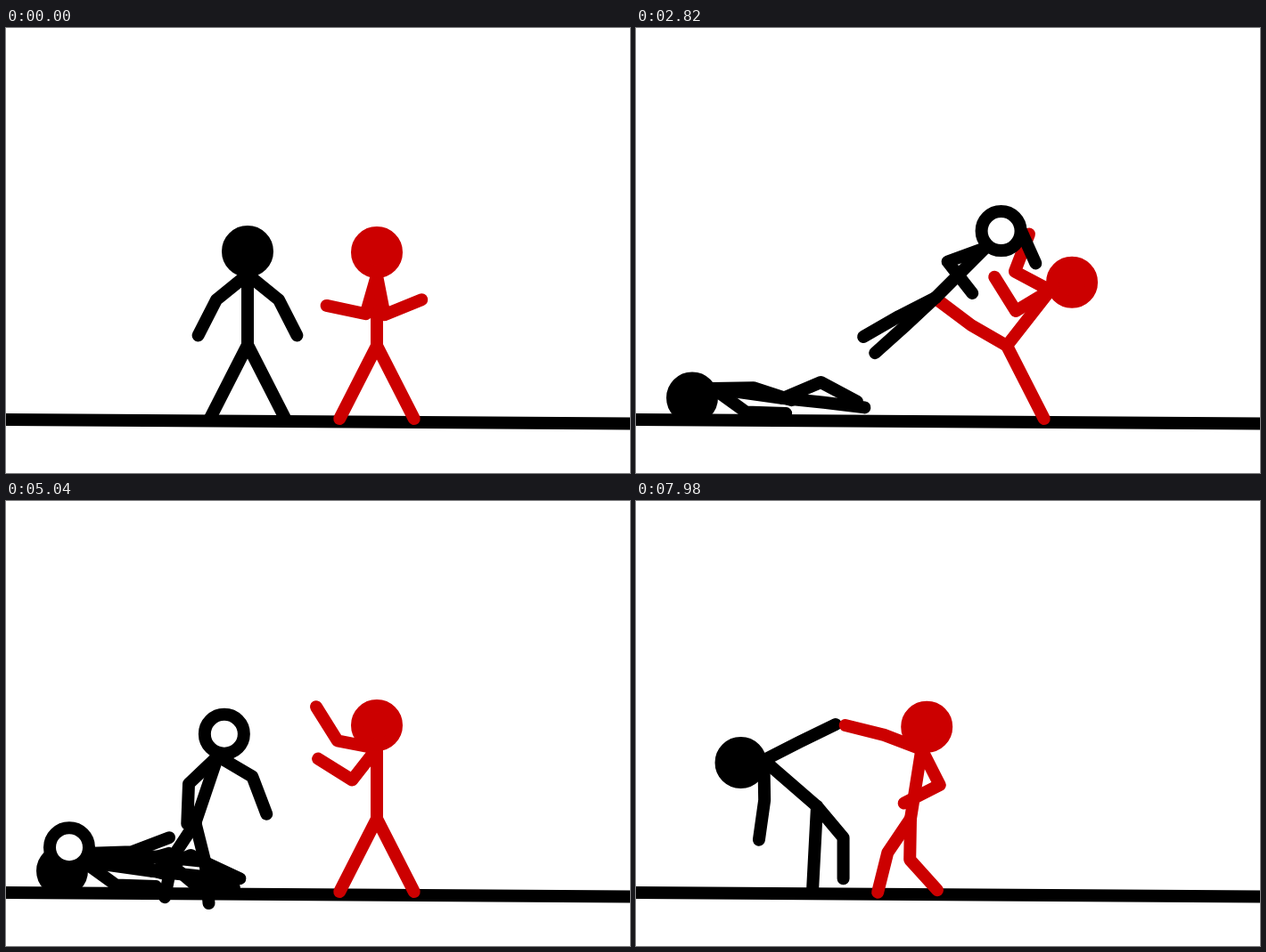
An HTML page with a canvas that plays this animation: 700 by 500 pixels, repeating every 8000 ms.

```html
<!DOCTYPE html>
<html>
<head>
<meta charset="utf-8">
<style>
html, body { margin: 0; width: 100%; height: 100%; overflow: hidden; background: #fff; }
canvas { display: block; }
</style>
</head>
<body>
<canvas id="stage" width="700" height="500"></canvas>
<script>
const ctx = document.getElementById('stage').getContext('2d');
const LOOP = 8000, STEP = 60, RED = '#c00', BLACK = '#000';
const TORSO = 79, NECK = 26, ARM = 45, LEG = 46, HEAD = 22, WIDTH = 14;

// A pose is the hip position plus bone directions in degrees (0 right, 90 down):
// body = torso, head; arms = upper, fore, twice; legs = thigh, shin, twice
const pose = (x, y, body, arms, legs) => ({ x, y, body, arms, legs });
const PARTS = ['body', 'arms', 'legs'];
const reach = (p, arms) => ({ ...p, arms });
const mirror = angles => angles.map(a => 180 - a);

function place(p, x, y, turn = 0) {
  const moved = { x, y };
  PARTS.forEach(part => moved[part] = p[part].map(a => a + turn));
  return moved;
}

const UPRIGHT = [-90, -90], STANCE = [117, 117, 63, 63], GUARD = [191, 238, 128, 212];

// Red fighter
const shrug = pose(416, 357, UPRIGHT, [106, 192, 79, -22], STANCE);
const guard = reach(shrug, GUARD);
const kick = pose(416, 357, [-52, -20], [208, 291, 149, 238], [210, 217, 63, 63]);
const lift = pose(413, 372, [-89, -81], [190, 249, 226, 310], [131, 36, 74, 20]);
const punch = pose(374, 357, [-81, -81], [141, 196, 62, 151], [131, 109, 98, 56]);
const launch = pose(325, 357, [-62, -57], [250, 311, 82, 170], [128, 83, 84, 62]);
const pull = pose(308, 357, [-81, -77], [201, 194, 63, 153], [124, 104, 91, 48]);

// Black fighters
const stand = pose(271, 356, UPRIGHT, [141, 117, 39, 63], STANCE);
const fists = reach(stand, mirror(GUARD));
const lying = pose(172, 415, [188, 156], [-1, 18, 36, 2], [-23, 28, 6, 7]);
const helped = pose(203, 343, [221, 174], [-27, -26, 89, 98], [93, 93, 50, 90]);
const kicked = pose(336, 303, [-45, -47], [160, 52, -32, 66], [153, 150, 137, 138]);
const prone = pose(178, 384, [3, -9], [118, -7, -3, 94], [149, 38, 128, 173]);
const kneel = pose(132, 310, [-94, -105], [20, -103, -102, -5], [149, 165, 115, 180]);
const held = pose(366, 146, [231, 235], [105, 79, 21, -51], [95, 113, 46, 72]);
const flat = pose(175, 400, [183, 195], [-2, -21, 16, -16], [6, 25, 40, 6]);
const flung = pose(344, 135, [225, 234], [33, 19, 58, 18], [1, 22, 30, 15]);

// Each key: hold from, hold until, pose, height of the hop leading to it
const black = [
  [0, 60, stand], [840, 960, place(fists, 311, 356)], [1620, 1860, lying, 60],
  [2100, 7440, place(lying, 165, 416)], [7980, 7980, helped]
];
const red = [
  [0, 60, shrug], [840, 900, reach(guard, punch.arms)], [1020, 1200, reach(guard, launch.arms)],
  [1560, 2220, guard], [2520, 2940, kick], [3360, 3660, guard], [4140, 4320, lift],
  [4440, 4620, reach(guard, punch.arms)], [4980, 5340, guard], [5820, 6120, punch],
  [6840, 6840, place(punch, 333, 357)], [6960, 7440, launch], [7980, 7980, pull]
];
const ringA = [
  [2100, 2100, place(kicked, 120, -110, -20)], [2820, 2880, kicked], [3480, 4560, prone, 110],
  [5160, 5340, place(stand, 221, 356)], [5760, 5760, place(fists, 283, 350)],
  [5940, 5940, kneel], [6240, 6240, place(kneel, -130, 370, -40), 20]
];
const ringB = [
  [3660, 3660, place(held, -90, 290, 30)], [4260, 4320, held, 35],
  [4440, 4620, place(held, 290, 310, -45)], [5040, 6180, flat, 15],
  [6540, 6540, place(stand, 161, 356)], [6900, 6900, place(fists, 280, 340)],
  [7020, 7020, flung], [7320, 7320, place(flung, 394, -95, 15)]
];

const mix = (a, b, k) => a + (b - a) * k;

// Turn the short way round
const swing = (a, b, k) => a + (((b - a) % 360 + 540) % 360 - 180) * k;

function poseAt(track, t) {
  const n = track.findIndex(key => key[1] >= t);
  if (n < 0) return null;
  const [from, , next, hop = 0] = track[n];
  if (t >= from) return next;
  if (n === 0) return null;
  const [, since, last] = track[n - 1];
  const k = (t - since) / (from - since);
  const p = { x: mix(last.x, next.x, k), y: mix(last.y, next.y, k) - hop * 4 * k * (1 - k) };
  PARTS.forEach(part => p[part] = last[part].map((a, i) => swing(a, next[part][i], k)));
  return p;
}

function along([x, y], deg, size) {
  const a = deg * Math.PI / 180;
  return [x + size * Math.cos(a), y + size * Math.sin(a)];
}

function line(points) {
  ctx.beginPath();
  points.forEach(([x, y]) => ctx.lineTo(x, y));
  ctx.stroke();
}

function limb(root, upper, lower, size) {
  const joint = along(root, upper, size);
  line([root, joint, along(joint, lower, size)]);
}

function figure(track, t, color, ring) {
  const p = poseAt(track, t);
  if (!p) return;
  const hip = [p.x, p.y], neck = along(hip, p.body[0], TORSO);
  ctx.strokeStyle = color;
  line([hip, neck]);
  for (const i of [0, 2]) {
    limb(neck, p.arms[i], p.arms[i + 1], ARM);
    limb(hip, p.legs[i], p.legs[i + 1], LEG);
  }
  ctx.fillStyle = ring ? '#fff' : color;
  ctx.beginPath();
  ctx.arc(...along(neck, p.body[1], NECK), HEAD, 0, Math.PI * 2);
  ctx.fill();
  ctx.stroke();
}

function draw(now) {
  const t = Math.floor(now % LOOP / STEP) * STEP;
  ctx.fillStyle = '#fff';
  ctx.fillRect(0, 0, 700, 500);
  ctx.lineWidth = WIDTH;
  ctx.lineCap = ctx.lineJoin = 'round';
  ctx.strokeStyle = BLACK;
  line([[-10, 440], [710, 444.5]]);
  figure(black, t, BLACK);
  figure(red, t, RED);
  figure(ringB, t, BLACK, true);
  figure(ringA, t, BLACK, true);
}

const start = performance.now();
function tick() {
  draw(performance.now() - start);
  requestAnimationFrame(tick);
}
tick();
</script>
</body>
</html>
```
